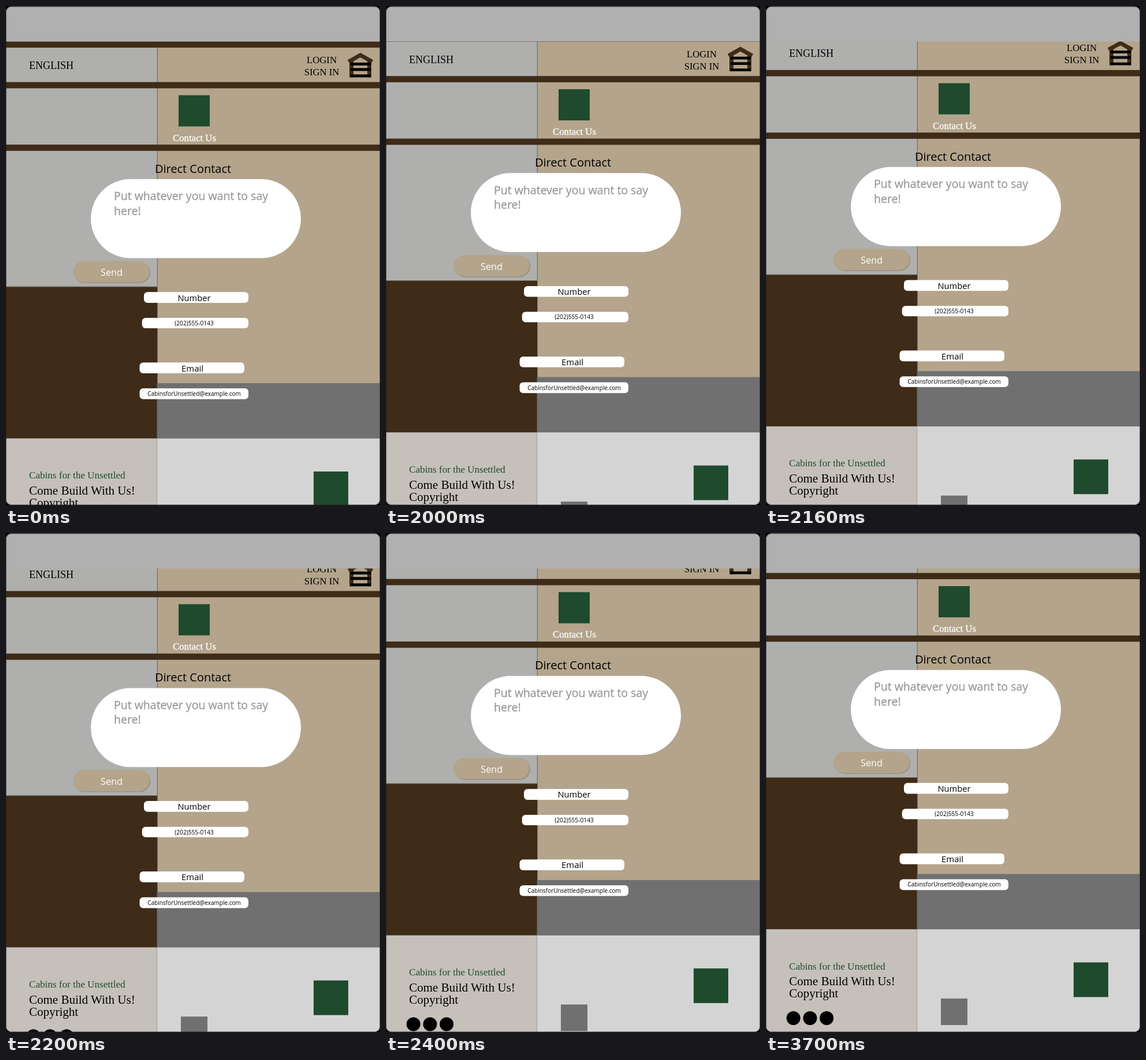
Write an HTML page that moves like this. It is 648 px wide and 864 px high and loops after 4.5 s.

```html
<!DOCTYPE html>
<html lang="en">
<head>
<meta charset="utf-8">
<title>Contact page scroll</title>
<style>
  html, body { margin: 0; width: 100%; height: 100%; overflow: hidden; background: #000; }
  svg { display: block; width: 100vw; height: 100vh; }
  .serif { font-family: "Liberation Serif", serif; }
  .sans { font-family: "Open Sans", "Noto Sans", sans-serif; }
  .mid { text-anchor: middle; }
  .tan { fill: #b3a48b; }
  .brown { fill: #3e2b18; }
  .green { fill: #1f4a2d; }
  .white { fill: #fff; }
</style>
</head>
<body>
<svg viewBox="0 0 648 864">
  <defs>
    <clipPath id="screen"><rect y=".8" width="648" height="863.2" rx="9"/></clipPath>
  </defs>
  <g clip-path="url(#screen)">
    <g id="page">
      <!-- Background panels -->
      <rect y="60" width="262" height="427" fill="#afafad"/>
      <rect class="tan" x="262" y="60" width="386" height="594"/>
      <rect x="261.6" y="60" width="1.4" height="593" fill="#77747a"/>
      <rect y="485.5" width="262" height="1" fill="#6c675f"/>
      <rect class="brown" y="486.4" width="261.4" height="262.2"/>
      <rect x="261.4" y="653" width="386.6" height="95.6" fill="#707070"/>
      <rect y="748.6" width="261.4" height="200" fill="#c5c0b9"/>
      <rect x="261.4" y="748.6" width="386.6" height="200" fill="#d4d4d4"/>
      <g class="brown">
        <rect y="61.4" width="648" height="10.7"/>
        <rect y="131.7" width="648" height="10.8"/>
        <rect y="240" width="648" height="10.8"/>
      </g>

      <!-- Top navigation -->
      <g class="serif">
        <text x="40" y="109" font-size="18">ENGLISH</text>
        <g class="mid" font-size="16.7">
          <text x="547" y="99">LOGIN</text>
          <text x="547" y="120">SIGN IN</text>
        </g>
      </g>
      <path d="M593.5 96.5L614 85L634.5 96.5M598.5 95V123.5M629.5 95V123.5"
            fill="none" stroke="#3e2b18" stroke-width="7"/>
      <path d="M597 100.5H632M597 110H632M597 121H632" stroke="#000" stroke-width="4.8"/>

      <!-- Contact section -->
      <rect class="green" x="299" y="154.5" width="54" height="54"/>
      <text class="serif mid white" x="326.5" y="233.5" font-size="16.8"
            stroke="#fff" stroke-width=".3">Contact Us</text>
      <g class="sans">
        <text class="mid" x="324" y="288.5" font-size="20">Direct Contact</text>
        <rect class="white" x="147" y="299.7" width="364" height="136.8" rx="68.4"/>
        <g font-size="19.5" fill="#999" stroke="#999" stroke-width=".3">
          <text x="187" y="336">Put whatever you want to say</text>
          <text x="187" y="361.5">here!</text>
        </g>
        <rect x="118" y="442.8" width="132" height="37" rx="18.5" fill="#8d8474" opacity=".75"/>
        <rect class="tan" x="117" y="441.6" width="131.6" height="36.8" rx="18.4"/>
        <text class="mid white" x="183" y="467" font-size="16.3">Send</text>

        <g class="white">
          <rect x="239" y="495.3" width="181" height="18.7" rx="6"/>
          <rect x="235.7" y="540" width="184.3" height="18" rx="6"/>
          <rect x="231.5" y="617.3" width="181.5" height="18.7" rx="6"/>
          <rect x="231.5" y="662" width="188.5" height="18.7" rx="6"/>
        </g>
        <g class="mid">
          <text x="326" y="510.5" font-size="14.7">Number</text>
          <text x="326" y="552.8" font-size="10.2">(202)555-0143</text>
          <text x="323" y="632.5" font-size="14.9">Email</text>
          <text x="326" y="675" font-size="10">CabinsforUnsettled@example.com</text>
        </g>
      </g>

      <!-- Footer -->
      <g class="serif">
        <text class="green" x="40" y="818.3" font-size="17.1">Cabins for the Unsettled</text>
        <g font-size="21">
          <text x="40" y="846">Come Build With Us!</text>
          <text x="40" y="867">Copyright</text>
        </g>
      </g>
      <circle cx="47.5" cy="902.6" r="12"/>
      <circle cx="76.3" cy="902.6" r="12"/>
      <circle cx="105" cy="902.6" r="12"/>
      <rect class="green" x="533" y="806" width="60" height="60"/>
      <rect x="303" y="868.5" width="46" height="46" fill="#707070"/>
    </g>

    <!-- Fixed header and screen outline -->
    <rect width="648" height="61.4" fill="#b0b0b0"/>
    <rect y=".8" width="648" height="863.2" rx="9" fill="none" stroke="#222" stroke-width="1.4" opacity=".7"/>
  </g>
</svg>
<script>
  const LOOP = 4500, SCROLL_START = 2000, STEP_TIME = 100, STEPS = 6, STEP_HEIGHT = 10.42;
  const page = document.getElementById("page");

  function draw(now) {
    const time = now % LOOP;
    const step = Math.floor((time - SCROLL_START) / STEP_TIME) + 1;
    const scroll = STEP_HEIGHT * Math.max(0, Math.min(STEPS, step));
    page.setAttribute("transform", `translate(0 ${-scroll})`);
  }

  const start = performance.now();
  function tick() {
    draw(performance.now() - start);
    requestAnimationFrame(tick);
  }
  tick();
</script>
</body>
</html>
```
